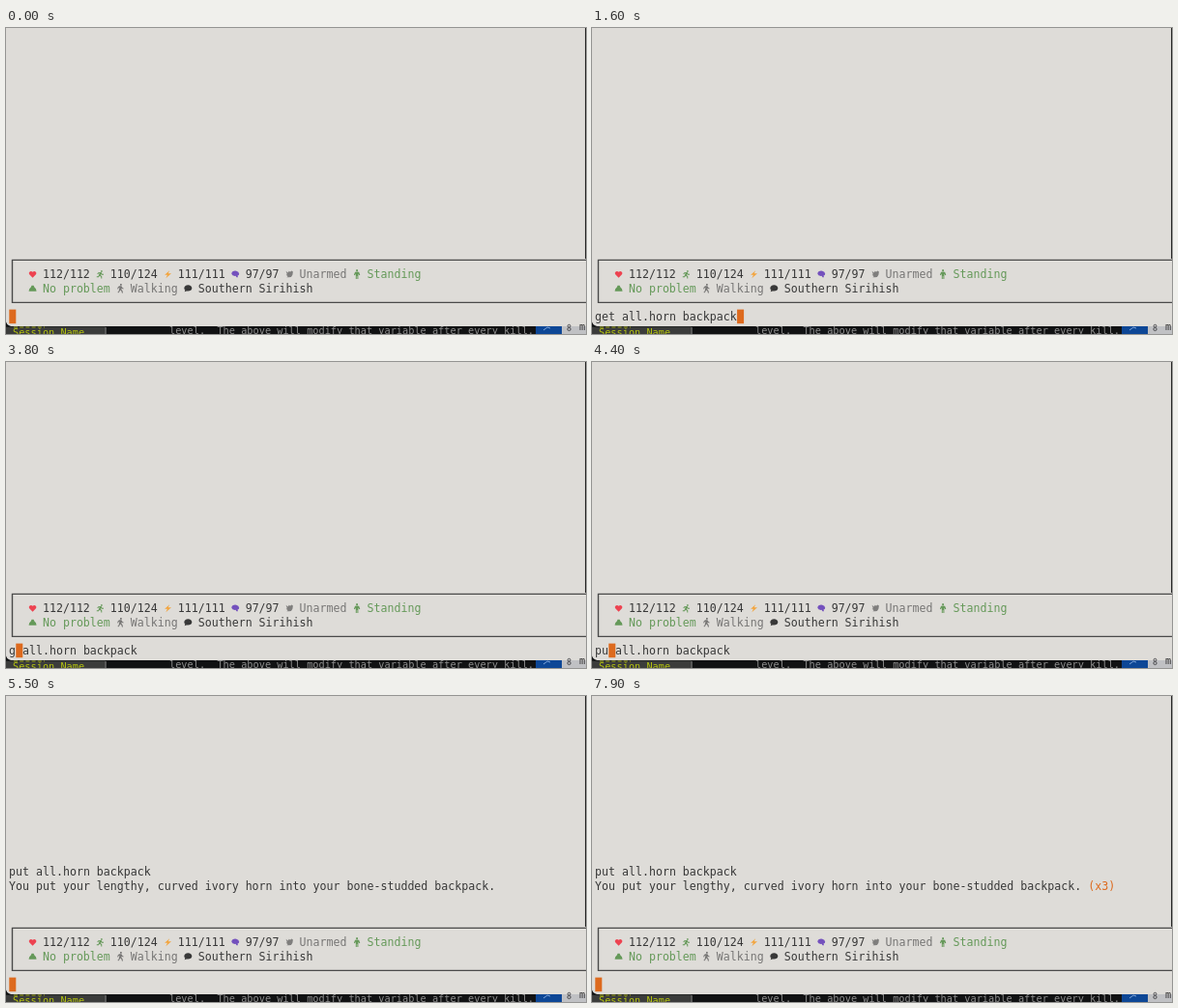
An HTML page that plays this animation: 600x317 px, repeating every 8000 ms.

```html
<!DOCTYPE html>
<html lang="en">
<head>
<meta charset="utf-8">
<title>Terminal session</title>
<style>
  html, body { margin: 0; width: 100%; height: 100%; overflow: hidden; background: #dedcd8; }
  svg { display: block; width: 100vw; height: 100vh; }
  text { font-family: "DejaVu Sans Mono", "Noto Sans Mono", monospace; font-size: 11.61px; white-space: pre; fill: #383838; }
  .behind text { font-size: 10.27px; }
</style>
</head>
<body>
<svg viewBox="0 0 600 317" preserveAspectRatio="none">
  <rect width="600" height="317" fill="#dedcd8"/>

  <g class="behind">
    <rect y="309" width="600" height="8" fill="#111213"/>
    <rect y="309.5" width="103" height="8" fill="#3b3c3b"/>
    <rect x="102.5" y="310" width="1.2" height="7" fill="#747474"/>
    <path d="M8 310H40" stroke="#9da51a" stroke-width="1.2" stroke-dasharray="4 2.2"/>
    <text x="7" y="319.3" style="fill:#b3c210">Session Name</text>
    <text x="169" y="317" style="fill:#8d8d8d">level.  The above will modify that variable after every kill.</text>
    <rect x="548" y="309" width="27" height="8" fill="#0d4796"/>
    <path d="M556 313l4-3M560 310l3 1" stroke="#7fa5da" fill="none"/>
    <rect x="575" y="309" width="25" height="8" fill="#c0c1c4"/>
    <g fill="none" stroke="#4a4a4e"><circle cx="582.5" cy="308.7" r="1.4"/><circle cx="582.5" cy="312" r="1.6"/></g>
    <text x="593" y="313" style="fill:#333">m</text>
    <path d="M0 304.5Q1.5 309 8 309.5H0Z" fill="#111213"/>
  </g>

  <path d="M599.5 0V239" stroke="#2a2a2a"/>
  <path d="M600 240.4H6.5V284.4H600" fill="none" stroke="#4a4a4a" stroke-width="1.4"/>
  <g id="status"></g>
  <text id="echo" x="3"></text>
  <text id="reply" x="3"></text>
  <text id="repeat"></text>
  <text id="input" x="3"></text>
  <rect id="cursor" y="291.6" width="7" height="14.6" fill="#dd6a1e"/>
  <text id="under" style="fill:#dedcd8"></text>
</svg>
<script>
const CELL = 6.99, LEFT = 3, LOOP = 8000;
const $ = id => document.getElementById(id);
const colX = col => LEFT + col * CELL;
// Baseline of a text row, counted upwards from the input line.
const rowY = row => 303.1 - row * 14.65;

const DARK = "#383838", GRAY = "#777675", GREEN = "#659959", ORANGE = "#dd6a1e";

// Icons live in an 8 by 8 box.
const ICONS = {
  heart: "M4 7.6L.6 4.1C-.8 2.2 1.8-.6 4 1.7C6.2-.6 8.8 2.2 7.4 4.1Z",
  run: "M4.6 0h1.6v1.6H4.6ZM2 2.1L5 1.8L6 3.6H7.5V4.5H5.4L4.9 3.8L4.3 4.9L5.8 6V8.3H4.8V6.6L3.4 5.6L2.4 7H.3V6H1.9L3.3 2.9L2.4 3L1.6 4.2L.8 3.7Z",
  bolt: "M5.8 0L4.4 3.2H7.6L2 8.2L3.6 4.6H.8Z",
  brain: "M1.2 1.2Q3 0 5 .5Q7.6 1 7.9 3.4Q8 5.2 6.3 5.4L6.7 7.2H5.2L4.3 5.7Q.6 6 .1 3.6Q0 2 1.2 1.2Z",
  fist: "M.4 .6L2.5 2.4L3.6 .5L4.8 1.7L6.2 .4L7.7 1.4L7.2 4.5Q6.4 7.2 3.7 7.2L1.1 7L2.4 6L.5 4.5L1.6 4Z",
  stand: "M3.1 -.8h1.8v1.8H3.1ZM2 1.6H6L7.2 4.7L6.2 5L5.3 3.4V8.8H4.3V5.8H3.7V8.8H2.7V3.4L1.8 5L.8 4.7Z",
  pile: "M3 1H5L5.8 2.8Q7.9 4 8 7H0Q.1 4 2.2 2.8Z",
  walk: "M3.6 -.8h1.7v1.7H3.6ZM2.6 1.5H5L6 3.3L7.3 4L6.9 4.8L5.1 3.9L4.9 5L6 6.3L6.6 8.6H5.5L4.9 6.8L3.7 5.6L3.1 7.2L1.7 8.7L1 8L2.2 6.6L3 3L2.1 3.4L1.6 4.7L.7 4.4L1.3 2.6Z",
  bubble: "M4 .5C6.4 .5 8 1.9 8 3.7S6.3 6.8 4 6.8Q3.2 6.8 2.5 6.6L.4 7.5L1 5.7Q0 5 0 3.7C0 1.9 1.7 .5 4 .5Z"
};

// icon, icon colour, label, label colour, column, row
const STATUS = [
  ["heart", "#ed4351", "112/112", DARK, 3, 3],
  ["run", GREEN, "110/124", DARK, 13, 3],
  ["bolt", "#f3a43c", "111/111", DARK, 23, 3],
  ["brain", "#7451bd", "97/97", DARK, 33, 3],
  ["fist", "#7f7e7d", "Unarmed", GRAY, 41, 3],
  ["stand", GREEN, "Standing", GREEN, 51, 3],
  ["pile", GREEN, "No problem", GREEN, 3, 2],
  ["walk", GRAY, "Walking", GRAY, 16, 2],
  ["bubble", DARK, "Southern Sirihish", DARK, 26, 2]
];
$("status").innerHTML = STATUS.map(([icon, tint, label, ink, col, row]) =>
  `<path d="${ICONS[icon]}" fill="${tint}" transform="translate(${colX(col) - .4} ${rowY(row) - 8})"/>` +
  `<text x="${colX(col + 2)}" y="${rowY(row)}" style="fill:${ink}">${label}</text>`).join("");

const FIRST = "get all.horn backpack";
const REST = FIRST.slice(3);
const SECOND = "put" + REST;
const REPLY = "You put your lengthy, curved ivory horn into your bone-studded backpack.";

for (const id of ["input", "under"]) $(id).setAttribute("y", rowY(0));
for (const id of ["reply", "repeat"]) $(id).setAttribute("y", rowY(7));
$("repeat").setAttribute("x", colX(REPLY.length + 1));
$("reply").textContent = REPLY;

// Prefix in front of the rest of the line while it is being corrected.
const EDITS = [[3300, "get"], [3600, "ge"], [3800, "g"], [3900, ""], [4200, "p"], [4400, "pu"], [4500, "put"]];
const ENTER = 4700, ANSWER = 5200, TWICE = 6200, THRICE = 7200;

// Number of 100 ms ticks from start to end that have passed.
const ticks = (t, start, end) =>
  Math.max(0, Math.floor((Math.min(t, end) - start) / 100) + 1);

function inputAt(t) {
  if (t < 1700) {
    const typed = Math.round(ticks(t, 100, 600) * 8 / 6 + ticks(t, 1000, 1600) * 13 / 7);
    return [FIRST.slice(0, typed), typed];
  }
  if (t < 3300) {
    const moves = ticks(t, 1700, 2300) + ticks(t, 2500, 2700) + ticks(t, 2900, 3100);
    return [FIRST, 21 - Math.round(moves * 18 / 14)];
  }
  if (t < ENTER) {
    const prefix = EDITS.filter(([at]) => at <= t).pop()[1];
    return [prefix + REST, prefix.length];
  }
  return ["", 0];
}

function draw(t) {
  const [line, col] = inputAt(t);
  $("input").textContent = line;
  $("cursor").setAttribute("x", colX(col) + .3);
  $("under").setAttribute("x", colX(col));
  $("under").textContent = line[col] || "";

  $("echo").textContent = t >= ENTER ? SECOND : "";
  $("echo").setAttribute("y", rowY(t < ANSWER ? 6 : 8));
  $("reply").style.display = t >= ANSWER ? "" : "none";
  $("repeat").textContent = t >= THRICE ? "(x3)" : t >= TWICE ? "(x2)" : "";
  $("repeat").style.fill = t >= THRICE ? ORANGE : "#577f42";
}

const start = performance.now();
function frame() {
  draw((performance.now() - start) % LOOP);
  requestAnimationFrame(frame);
}
frame();
</script>
</body>
</html>
```
